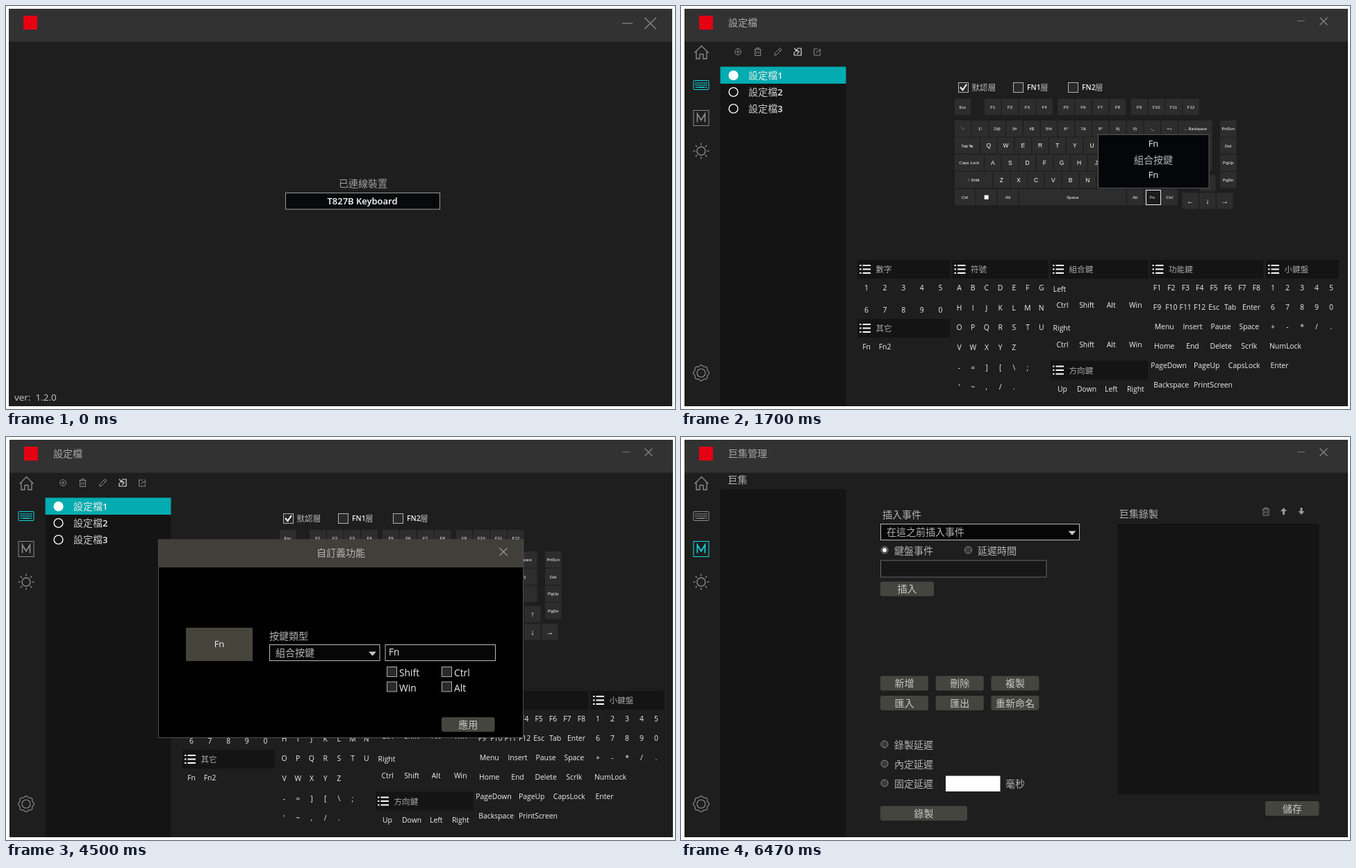
Recreate the animation shown at these times as an HTML page. Size 963 by 581 pixels, loop 8 s.

```html
<!DOCTYPE html>
<html lang="zh-Hant">
<head>
<meta charset="utf-8">
<title>Keyboard settings</title>
<style>
html, body { margin: 0; width: 100%; height: 100%; overflow: hidden; background: #fff; }
svg { display: block; width: 963px; height: 581px; }
text { font-family: 'Open Sans', 'Noto Sans CJK TC', 'Noto Sans CJK JP', sans-serif; font-weight: 500; white-space: pre; }
.zh { font-family: 'Noto Sans CJK TC', 'Noto Sans CJK JP', 'Noto Sans CJK', sans-serif; font-weight: 300; }
.cap { font-family: 'Liberation Sans', 'DejaVu Sans', sans-serif; }
.bold { font-weight: 600; }
</style>
</head>
<body>
<svg id="stage" viewBox="0 0 963 581"></svg>
<script>
const GREY = '#8a8a8a', CYAN = '#12d8e0', PANEL = '#141414', BODY = '#1e1e1e', BUTTON = '#45453f';

// Drawing helpers: every y of a text is its visual centre.
const rect = (x, y, w, h, fill, stroke = 'none', rx = 0) =>
  `<rect x="${x}" y="${y}" width="${w}" height="${h}" fill="${fill}" stroke="${stroke}" rx="${rx}"/>`;
const circle = (x, y, r, fill, stroke = 'none', w = 1) =>
  `<circle cx="${x}" cy="${y}" r="${r}" fill="${fill}" stroke="${stroke}" stroke-width="${w}"/>`;
const path = (d, stroke, w = 1, fill = 'none') =>
  `<path d="${d}" stroke="${stroke}" stroke-width="${w}" fill="${fill}"/>`;
const text = (x, y, s, size = 10.4, fill = '#f0f0f0', anchor = 'middle', cls = '') =>
  `<text x="${x}" y="${y + size * (cls === 'zh' ? .38 : .36)}" font-size="${size}" fill="${fill}" text-anchor="${anchor}" class="${cls}">${s.replace(/&/g, '&amp;').replace(/</g, '&lt;')}</text>`;
const zh = (x, y, s, fill = '#b4b4b4', size = 14, anchor = 'start') => text(x, y, s, size, fill, anchor, 'zh');
const group = (id, ...parts) => `<g id="${id}">${parts.join('')}</g>`;
const at = (x, y, s) => `<g transform="translate(${x} ${y})">${s}</g>`;
const cross = (x, y, r, w = 1.2, color = '#888') => path(`M${x - r} ${y - r}l${2 * r} ${2 * r}m0 ${-2 * r}l${-2 * r} ${2 * r}`, color, w);
const button = (x, y, w, s, h = 21) => rect(x, y, w, h, BUTTON, 'none', 3) + zh(x + w / 2, y + h / 2, s, '#c8c8c8', 14, 'middle');
const select = (x, y, w, s) => rect(x, y, w, 23, '#060606', '#b8b8b8') + zh(x + 8.5, y + 11.5, s) +
  path(`M${x + w - 16} ${y + 10}h11l-5.5 6z`, 'none', 0, '#c8c8c8');
const box = (x, y) => rect(x, y, 14, 14, '#2a2a2a', '#b0b0b0');
const radio = (x, y, on) => circle(x, y, 5, '#3a3a3a', '#8a8a8a') + (on ? circle(x, y, 3, '#fff') : '');

const windowFrame = x => rect(x, 4, 955, 573, BODY) + rect(x, 4, 955, 47.5, '#323232') + rect(x + 21, 14, 20, 20, '#e50012');

const trash = (x, y, c = GREY) => at(x, y, path('M-5 -3.5h10M-2 -3.5v-2h4v2M-4 -3.5v9h8v-9M-1.5 -1v4M1.5 -1v4', c));
const home = path('M-10 1L0 -9L10 1M-7.5 -1V9.5H-2.5V3H2.5V9.5H7.5V-1', GREY, 1.4);
const keyboardIcon = c => rect(-11, -6.5, 22, 13, 'none', c, 1) +
  [-3, 0].map(y => path(`M-8.5 ${y}H9`, c, 1.6).replace('/>', ' stroke-dasharray="2 1"/>')).join('') + path('M-8 3.3h2M-5 3.3H5M6 3.3h2', c, 1.6);
const macroIcon = c => rect(-11, -11, 22, 22, 'none', c) + path('M-5.5 6V-6L0 3L5.5 -6V6', c, 1.7);
const ring = (n, f) => Array.from({ length: n }, (_, i) => f(i * 2 * Math.PI / n)).join('');
const sun = circle(0, 0, 6, 'none', GREY, 1.4) +
  ring(8, a => path(`M${8.5 * Math.cos(a)} ${8.5 * Math.sin(a)}L${11.5 * Math.cos(a)} ${11.5 * Math.sin(a)}`, GREY, 1.4));
const gear = circle(0, 0, 6, 'none', GREY, 1.2) + path('M' + ring(64, a => {
  const r = 10.6 + .9 * Math.cos(8 * a);
  return `${(r * Math.cos(a)).toFixed(2)} ${(r * Math.sin(a)).toFixed(2)} `;
}) + 'z', GREY, 1.2);
const frame = (title, keyColor, macroColor) => windowFrame(5) + zh(68, 24, title, '#a8a8a8') +
  path('M887 21.5h11', '#777') + cross(925, 22, 5.5) +
  at(29.5, 66.5, home) + at(29, 114, keyboardIcon(keyColor)) + at(29, 161.5, macroIcon(macroColor)) +
  at(29, 209, sun) + at(29, 529, gear);

// Start screen
const start = windowFrame(4) + path('M887 25h15', GREY, 1.2) + cross(927.5, 25, 8.3, 1.4) +
  zh(514, 255.5, '已連線裝置', '#a0a0a0', 14, 'middle') + rect(402.5, 269.5, 222, 23.5, '#08090c', '#999') +
  text(513, 281.5, 'T827B Keyboard', 13, '#fff', 'middle', 'bold') + text(12, 564.5, 'ver:  1.2.0', 13.5, '#c8c8c8', 'start');

// Profile list
const profiles = [1, 2, 3].map((n, i) => {
  const y = 100 + 24 * i, on = !i;
  return (on ? rect(56.5, 87.5, 181, 24.5, '#02acb0') : '') + circle(75.5, y, 6.4, on ? '#fff' : 'none', '#fff', 1.4) +
    zh(97, y, '設定檔', on ? '#e8e8e8' : '#c8c8c8') + text(139, y, '' + n, 13, '#f0f0f0', 'start', 'bold');
}).join('');
const tools = circle(82, 66, 4.5, 'none', GREY) + path('M79.5 66h5M82 63.5v5', GREY) + trash(110.5, 66) +
  at(139.5, 66, path('M-5 5L-4 1.5L3 -5.5L5.5 -3L-1.5 4zM1 -3.5L3.5 -1', GREY)) +
  at(168, 66, path('M-1 -5H5V5H-5V0M-5 -5L-1 -1M-1 -4V-1H-4M-1 3L2 0L0 -2', '#ddd', 1.2)) +
  at(196.5, 66, path('M0 -4H-5V5H4V1M-2 2Q-1 -2 4 -2M2 -5L5 -2L2 1', GREY));
const layers = box(399.5, 110.5) + box(478.5, 110.5) + box(557.5, 110.5) + path('M402 117l3.5 4L411 113', '#fff', 2) +
  zh(418.5, 117.5, '默認層', '#b8b8b8', 11.6) + ['FN1', 'FN2'].map((s, i) =>
    text(498 + 79 * i, 117, s, 10.4, '#eee', 'start', 'bold') + zh(517 + 79 * i, 117.5, '層', '#b8b8b8', 11.6)).join('');

// Keyboard
const UNIT = 24.8;
const key = (x, y, label, units = 1) => {
  const w = units * UNIT - 1.3, size = /^[A-Z]$/.test(label) ? 8.5 : /^[←↑→↓]$/.test(label) ? 11 : /Back/.test(label) ? 5.4 : 6.2;
  return rect(x, y - 11.8, w, 23.5, '#2d2d2d', 'none', 1) +
    (label === 'win' ? rect(x + w / 2 - 3, y - 3, 6, 6, '#fff') : text(x + w / 2, y, label, size, '#fff', 'middle', 'cap'));
};
const row = (x, y, labels) => labels.split(' ').map(s => {
  const [, label, units = 1] = s.match(/^(.+?)(?::([\d.]+))?$/), k = key(x, y, label, +units);
  x += units * UNIT;
  return k;
}).join('');
const keyboard = [
  [393.8, 145.5, 'Esc'], [437, 145.5, 'F1 F2 F3 F4'], [542.3, 145.5, 'F5 F6 F7 F8'], [647.8, 145.5, 'F9 F10 F11 F12'],
  [393.8, 176.7, '`~ 1! 2@ 3# 4$ 5% 6^ 7& 8* 9( 0) -_ =+ ←\u00a0Backspace:2'],
  [393.8, 201.4, 'Tab\u00a0↹:1.5 Q W E R T Y U I O P [{ ]} \\|:1.5'],
  [393.8, 226.1, 'Caps\u00a0Lock:1.75 A S D F G H J K L ;: \'" Enter:2.25'],
  [393.8, 250.9, '↑\u00a0Shift:2.25 Z X C V B N M ,< .> /? Shift:1.75'],
  [393.8, 275.7, 'Ctrl:1.25 win:1.25 Alt:1.25 Space:6.25 Alt Fn Ctrl'],
  [746.2, 255.5, '↑'], [721.4, 281, '← ↓ →'],
  [776, 176.7, 'PrtScn'], [776, 201.4, 'Del'], [776, 226.1, 'PgUp'], [776, 250.9, 'PgDn']
].map(r => row(...r)).join('');

// Assignable functions
const header = (x, y, w, s) => rect(x, y, w, 27, PANEL) + [8, 13.5, 19].map(d =>
  path(`M${x + 3} ${y + d}h2.5m2 0h11.5`, '#fff', 2)).join('') + zh(x + 26.5, y + 14, s, '#a8a8a8', 11.6);
const line = (y, xs, s) => s.split(' ').map((w, i) => text(xs[i], y, w)).join('');
const steps = (x, d) => Array.from({ length: 8 }, (_, i) => x + d * i);
const digits = steps(267, 26.6), letters = steps(400.5, 19.7), mods = steps(549, 35.1), fns = steps(685.5, 20.4),
  wide = steps(695.7, 40.7), pad = steps(852, 21);
const functions = [
  [254, 366, 133, '數字'], [254, 451, 133, '其它'], [390.5, 366, 138.5, '符號'], [532, 366, 140.5, '組合鍵'],
  [532, 511.5, 140.5, '方向鍵'], [675.5, 366, 163, '功能鍵'], [842, 366, 105, '小鍵盤']
].map(h => header(...h)).join('') + [
  [406.5, digits, '1 2 3 4 5'], [438, digits, '6 7 8 9 0'], [491.5, digits, 'Fn Fn2'],
  ...['A B C D E F G', 'H I J K L M N', 'O P Q R S T U', 'V W X Y Z', '- = ] [ \\ ;', "' ~ , / ."].map((s, i) => [406.5 + 28.6 * i, letters, s]),
  [408, [545], 'Left'], [431.7, mods, 'Ctrl Shift Alt Win'], [464, [548], 'Right'], [487.8, mods, 'Ctrl Shift Alt Win'],
  [552.7, mods, 'Up Down Left Right'],
  [406.5, fns, 'F1 F2 F3 F4 F5 F6 F7 F8'], [434.5, [685.5, 705.8, 726.2, 746.5, 767, 790.5, 821], 'F9 F10 F11 F12 Esc Tab Enter'],
  [462.5, wide, 'Menu Insert Pause Space'], [490.5, wide, 'Home End Delete Scrlk'],
  [518.5, [702, 756.7, 810.7], 'PageDown PageUp CapsLock'], [546.5, [705.7, 766], 'Backspace PrintScreen'],
  [406.5, pad, '1 2 3 4 5'], [434.5, pad, '6 7 8 9 0'], [462.5, pad, '+ - * / .'], [490.5, [870], 'NumLock'], [518.5, [861.5], 'Enter']
].map(l => line(...l)).join('');

const settings = frame('設定檔', CYAN, GREY) + rect(56.5, 87.5, 181, 489.5, PANEL) + tools + profiles + layers + keyboard + functions;

const fnKey = (fill, stroke) => rect(669.5, 265.5, 21, 21, fill, stroke) + text(678.5, 275.7, 'Fn', 6.2, '#fff', 'middle', 'cap');
const tip = rect(600.5, 185.5, 159.5, 77, '#050609', '#585858') + text(680, 198.5, 'Fn', 13) +
  zh(680, 222, '組合按鍵', '#b4b4b4', 14, 'middle') + text(680, 243.5, 'Fn', 13);
const menu = fnKey('#b4b4b4', '#c4c4c4') + rect(670.5, 287.5, 158, 68.5, '#050609', '#606060') + rect(674, 332, 151, 20.5, '#dcdcdc') +
  zh(674, 301.5, '內定功能') + zh(674, 322, '禁用按鍵') + zh(674, 342.5, '自訂義功能', '#3a3a3a');

const dialog = rect(219.5, 148, 525, 285.5, '#000', '#505050') + rect(220, 148, 524, 40, '#403f39') +
  zh(482, 167, '自訂義功能', '#b8b8b8', 14, 'middle') + cross(716, 165.5, 5.5, 1.2, '#999') +
  rect(259, 275, 96, 48, '#45453c') + text(307, 298, 'Fn', 13) + zh(379, 286.5, '按鍵類型') +
  select(379.5, 299.5, 158.5, '組合按鍵') + rect(546, 299.5, 158.5, 23, '#060606', '#b8b8b8') + text(551, 310.5, 'Fn', 13.6, '#eee', 'start') +
  [['Shift', 548, 340], ['Ctrl', 627, 340], ['Win', 548, 361.5], ['Alt', 627, 361.5]].map(([s, x, y]) =>
    box(x + .5, y - 8.5) + text(x + 18, y + .5, s, 13.8, '#eee', 'start')).join('') + button(627, 404, 76.5, '應用');

// Macro page
const arrow = (x, d) => at(x, 107, path(`M0 ${5 * d}L-4.5 0H-1.5V${-5 * d}H1.5V0H4.5z`, 'none', 0, '#999'));
const macro = frame('巨集管理', GREY, CYAN) + zh(67.5, 62, '巨集') + rect(56.5, 75, 181, 502, PANEL) +
  zh(290, 112, '插入事件') + select(287.5, 125.5, 286, '在這之前插入事件') +
  radio(293, 163, true) + zh(307, 163.5, '鍵盤事件') + radio(413.5, 163) + zh(427, 163.5, '延遲時間') +
  rect(287.5, 178, 238.5, 24, '#171717', '#666') + button(287, 208.5, 77, '插入') +
  ['新增', '刪除', '複製', '匯入', '匯出', '重新命名'].map((s, i) =>
    button(287 + 79.7 * (i % 3), i < 3 ? 344.5 : 373, 69, s)).join('') +
  ['錄製延遲', '內定延遲', '固定延遲'].map((s, i) => radio(293, 443 + 28 * i) + zh(307, 443.5 + 28 * i, s)).join('') +
  rect(381, 488.5, 78.5, 22.5, '#fff') + zh(467, 500, '毫秒') + button(287, 532, 125, '錄製') +
  zh(631, 110.5, '巨集錄製') + trash(842, 107.5) + arrow(867.5, -1) + arrow(893, 1) +
  rect(628, 125, 290.5, 390, PANEL) + button(841, 525, 77.5, '儲存');

const layersShown = { start, settings, focus: fnKey('#1b1b1b', '#eee'), tip, menu, dialog, macro };
document.getElementById('stage').innerHTML = Object.entries(layersShown).map(([id, s]) => group(id, s)).join('');

const scenes = [
  [500, 'start'], [2500, 'settings', 'focus', 'tip'], [4500, 'settings', 'tip', 'menu'],
  [6470, 'settings', 'dialog'], [8000, 'macro']
];
const nodes = Object.keys(layersShown).map(id => document.getElementById(id));
function draw(now) {
  const t = now % 8000, scene = scenes.find(s => t < s[0]);
  for (const n of nodes) n.style.display = scene.includes(n.id) ? '' : 'none';
  requestAnimationFrame(tick);
}
const begin = performance.now();
const tick = () => draw(performance.now() - begin);
draw(0);
</script>
</body>
</html>
```
